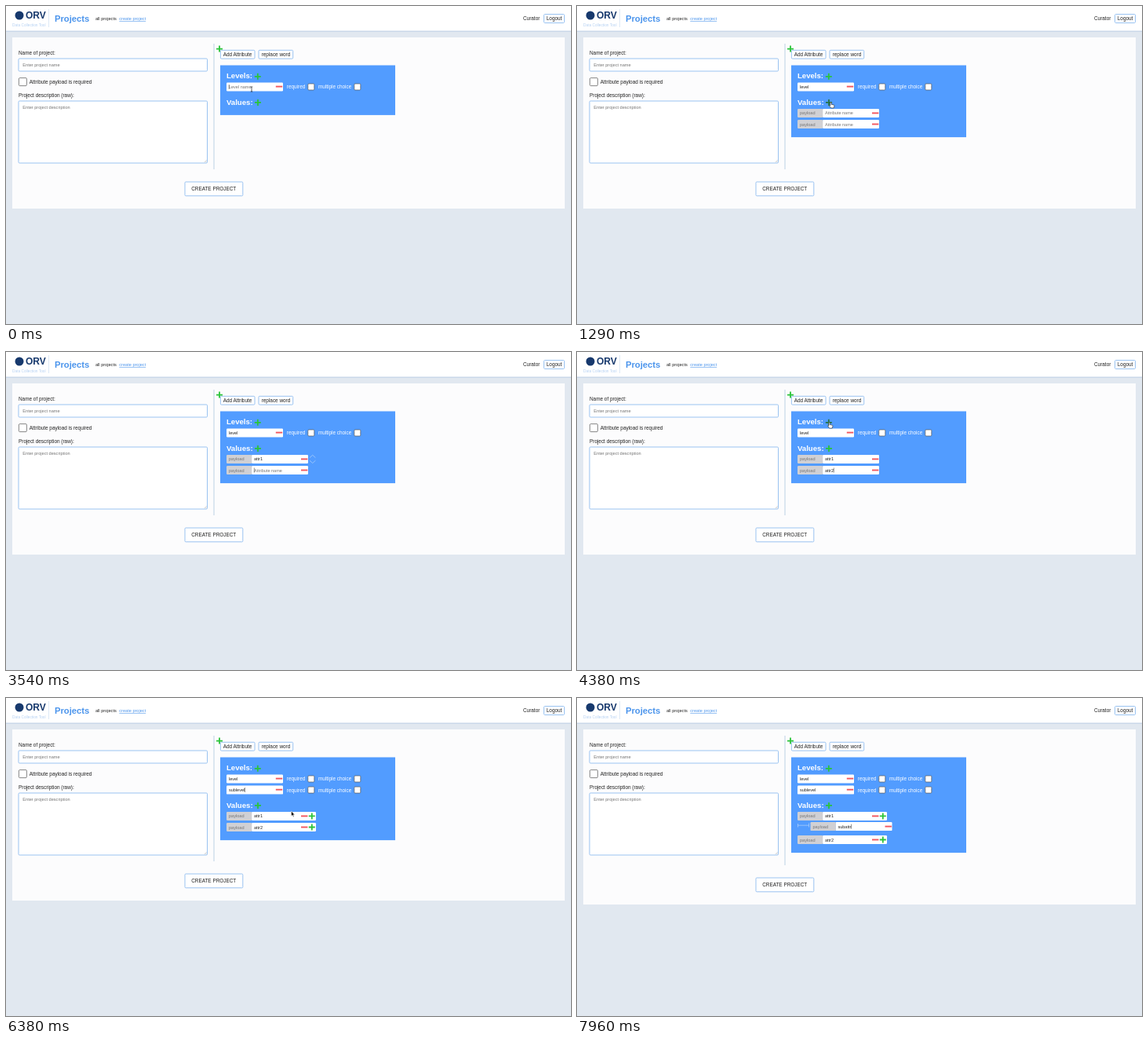
An HTML page for the animation above (8 s loop, 720x405 px).

```html
<!DOCTYPE html>
<html lang="en">
<head>
<meta charset="utf-8">
<title>Create project</title>
<style>
  html, body { margin: 0; width: 100%; height: 100%; overflow: hidden; background: #e1e8f0; }
  svg { display: block; width: 720px; height: 405px; }
  text { font-family: "Liberation Sans", Arial, sans-serif; font-size: 6.4px; fill: #222; white-space: pre; }
  .small { font-size: 5.6px; }
  .field { font-size: 5.5px; }
  .hint { fill: #757575; }
  .white { fill: #fff; }
  .head { font-size: 9.6px; font-weight: bold; fill: #fff; }
  .box { fill: #fff; stroke: #8fbdf0; stroke-width: .9; }
  .check { fill: #fff; stroke: #555; stroke-width: .7; }
</style>
</head>
<body>
<svg viewBox="0 0 720 405" id="stage">
  <rect width="720" height="405" fill="#e1e8f0"/>
  <rect y="31" width="720" height="2" fill="#c9d8e9"/>
  <rect width="720" height="31.5" fill="#fff"/>
  <circle cx="17" cy="12" r="5.5" fill="#17396d"/>
  <text x="25" y="16" style="font-size:12px;font-weight:bold;fill:#17396d">ORV</text>
  <text x="8" y="25.5" style="font-size:4.8px;fill:#b4d0f2">Data Collection Tool</text>
  <path d="M54.5 4V27" stroke="#cfe0f2" stroke-width=".7"/>
  <text x="62" y="20" style="font-size:11.2px;font-weight:bold;fill:#4a94ec">Projects</text>
  <text class="small" x="114" y="18.2">all projects</text>
  <text class="small" x="144.3" y="18.2" style="fill:#4a94ec;text-decoration:underline">create project</text>
  <text x="659" y="18.3">Curator</text>
  <rect class="box" x="685.5" y="10.5" width="26" height="11" rx="1.2"/>
  <text x="688.8" y="18.3">Logout</text>
  <g id="live"></g>
  <g id="pointer"></g>
</svg>
<script>
const LOOP = 8000;
const live = document.getElementById('live');
const pointer = document.getElementById('pointer');
const ruler = document.createElement('canvas').getContext('2d');
ruler.font = '55px "Liberation Sans", Arial, sans-serif';
const widthOf = s => ruler.measureText(s).width / 10;

// [word, first key, ms per key]
const typing = {
  level: ['level', 270, 90],
  attr1: ['attr1', 1950, 150],
  attr2: ['attr2', 3600, 100],
  sub: ['sublevel', 4970, 95],
  subattr: ['subattr', 7250, 90]
};
const cue = {
  row1: 1090, row2: 1270, focus1: 1700, focus2: 2960,
  saved: 4400, level2: 4450, focusSub: 4760, child: 6700, focusChild: 6980
};

// [time, x, y, shape while heading to the next point]
const path = [
  [0, 313, 106, 'beam'], [250, 313, 106, ''],
  [720, 313, 106, 'arrow'], [990, 323.5, 122.3, 'hand'],
  [1400, 323.5, 122.3, 'arrow'], [1620, 345, 136.5, 'beam'], [1920, 345, 136.5, ''],
  [4120, 345, 136.5, 'arrow'], [4340, 321.5, 89.5, 'hand'],
  [4540, 321.5, 89.5, 'arrow'], [4700, 330, 117, 'beam'], [4940, 330, 117, ''],
  [6150, 330, 117, 'arrow'], [6380, 363.5, 144, 'arrow'], [6560, 390, 150, 'hand'],
  [6760, 390, 150, 'arrow'], [6940, 371, 161, 'beam'], [7230, 371, 161, ''],
  [LOOP, 371, 161, '']
];
const shapes = {
  beam: '<path d="M-1.2-3.3Q0-3.3 0-2.4Q0-3.3 1.2-3.3M0-2.4V2.4M-1.2 3.3Q0 3.3 0 2.4Q0 3.3 1.2 3.3" fill="none" stroke="#222" stroke-width=".7"/>',
  arrow: '<path d="M0 0V6.4L1.5 5.1L2.5 7.4L3.5 7L2.5 4.8H4.5Z" fill="#111" stroke="#fff" stroke-width=".5"/>',
  hand: '<path d="M-.7.7Q0-.5.7.7V3L3.6 3.6Q4.6 4 4.4 5L3.7 7.6H.2L-1.9 4.9Q-1.8 3.9-.7 4.6Z" fill="#fff" stroke="#222" stroke-width=".6"/>'
};

const between = (t, a, b) => t >= a && t < b;
const text = (x, y, s, cls = '') => `<text x="${x}" y="${y}" class="${cls}">${s}</text>`;
const rect = (x, y, w, h, attrs) => `<rect x="${x}" y="${y}" width="${w}" height="${h}" ${attrs}/>`;
const line = (d, color, w) => `<path d="${d}" fill="none" stroke="${color}" stroke-width="${w}"/>`;
const box = (x, y, w, h) => rect(x, y, w, h, 'class="box" rx="1.2"');
const check = (x, y, size) => rect(x, y, size, size, 'class="check" rx="1.2"');
const plus = (x, y, hover) => line(`M${x - 4} ${y}h8M${x} ${y - 4}v8`, hover ? '#267346' : '#2bc43a', 1.8);
const minus = (x, y) => line(`M${x} ${y}h8.4`, '#f2575f', 1.9);

function typed(key, t) {
  const [word, start, step] = typing[key];
  return t < start ? '' : word.slice(0, Math.floor((t - start) / step) + 1);
}

function input(x, y, w, value, hint, focused) {
  const caretX = x + 3.3 + widthOf(value);
  return rect(x, y - 5.5, w, 11, 'rx="1.2" fill="#fff"') +
    text(x + 3, y + 2, value || hint, value ? 'field' : 'field hint') +
    (focused ? line(`M${caretX} ${y - 3}v6`, '#222', .5) : '');
}

function levelRow(y, value, focused) {
  return input(281, y, 72, value, 'Level name', focused) + minus(343.8, y - .4) +
    text(357.8, y + 2.4, 'required', 'white') + check(384.8, y - 4, 8) +
    text(398, y + 2.4, 'multiple choice', 'white') + check(443.8, y - 4, 8);
}

function valueRow(x, y, o) {
  const end = x + 104;
  return input(x + 32, y, o.plus ? 82 : 72, o.value, 'Attribute name', o.focused) +
    rect(x, y - 5.5, 32.3, 11, 'rx="1.2" fill="#d0d0d4"') +
    text(x + 3, y + 2, 'payload', 'small hint') + minus(end - 9, y) +
    (o.plus ? plus(end + 4.8, y, o.plusHover) : '') +
    (o.chevrons ? line(`M${end + 2} ${y - 1.8}l3.7-3.3l3.7 3.3M${end + 2} ${y + 1.8}l3.7 3.3l3.7-3.3`, '#a9cdfa', .8) : '');
}

function scene(t) {
  const rows = (t >= cue.row1) + (t >= cue.row2);
  const second = t >= cue.level2, child = t >= cue.child;
  const drop = second ? 14 : 0, sink = child ? 5 : 0, saved = t >= cue.saved;
  const first = 136.4 + drop;
  let s = rect(8, 40, 704, 218 + sink, 'fill="#fcfcfd"');

  s += text(16, 62, 'Name of project:') + box(16, 67, 240.5, 16) +
    text(21.3, 77, 'Enter project name', 'small hint') +
    rect(16.4, 91.6, 10, 10, 'class="check" rx="1.2"') +
    text(29.8, 98.7, 'Attribute payload is required') +
    text(16, 115.5, 'Project description (raw):') + box(16, 121, 240.5, 79) +
    text(21.3, 130.5, 'Enter project description', 'small hint') +
    line('M253 199l2.7-2.7M254.7 199l1-1', '#888', .4) +
    line(`M265 48V${208 + sink}`, '#b5cde3', .9) +
    box(228, 224 + sink, 73.8, 17.8) + text(236.2, 235.4 + sink, 'CREATE PROJECT');

  s += box(273.4, 56.3, 43.6, 10.8) + text(276.7, 64, 'Add Attribute') +
    box(322, 56.3, 43.7, 10.8) + text(325.7, 64, 'replace word') + plus(272, 54.6);

  s += rect(273, 75.5, 223, 63.4 + rows * 14.1 + drop + (child ? 16 : 0), 'fill="#529cff"') +
    text(281, 92.2, 'Levels:', 'head') + plus(320.8, 89.8, between(t, 4340, 4560)) +
    levelRow(103, typed('level', t), t < cue.row1);
  if (second) s += levelRow(117.1, typed('sub', t), between(t, cue.focusSub, cue.child));
  s += text(281, 125.5 + drop, 'Values:', 'head') +
    plus(321, 122.9 + drop, between(t, 990, 1430));

  if (rows > 0) s += valueRow(281, first, {
    value: typed('attr1', t), focused: between(t, cue.focus1, cue.focus2),
    plus: saved, plusHover: between(t, 6540, 6780), chevrons: between(t, 1600, 4160)
  });
  if (rows > 1) s += valueRow(281, first + 14.1 + (child ? 16 : 0), {
    value: typed('attr2', t), focused: between(t, cue.focus2, cue.level2), plus: saved
  });
  if (child) s += line('M281.5 160v4.5M281.5 162.2H295.5M295.5 159.5v5', '#a9cdfa', .8) +
    valueRow(297.5, 163.6, {
      value: typed('subattr', t), focused: t >= cue.focusChild, chevrons: between(t, 6920, 7250)
    });
  return s;
}

function cursor(t) {
  const i = path.findIndex((p, n) => n + 1 === path.length - 1 || t < path[n + 1][0]);
  const [t0, x0, y0, shape] = path[i], [t1, x1, y1] = path[i + 1];
  if (!shape) return '';
  const p = (t - t0) / (t1 - t0), e = p * p * (3 - 2 * p);
  return `<g transform="translate(${x0 + (x1 - x0) * e} ${y0 + (y1 - y0) * e})">${shapes[shape]}</g>`;
}

let last = '';
const begin = performance.now();
function frame() {
  const t = (performance.now() - begin) % LOOP;
  const next = scene(t);
  if (next !== last) live.innerHTML = last = next;
  pointer.innerHTML = cursor(t);
  requestAnimationFrame(frame);
}
frame();
</script>
</body>
</html>
```
